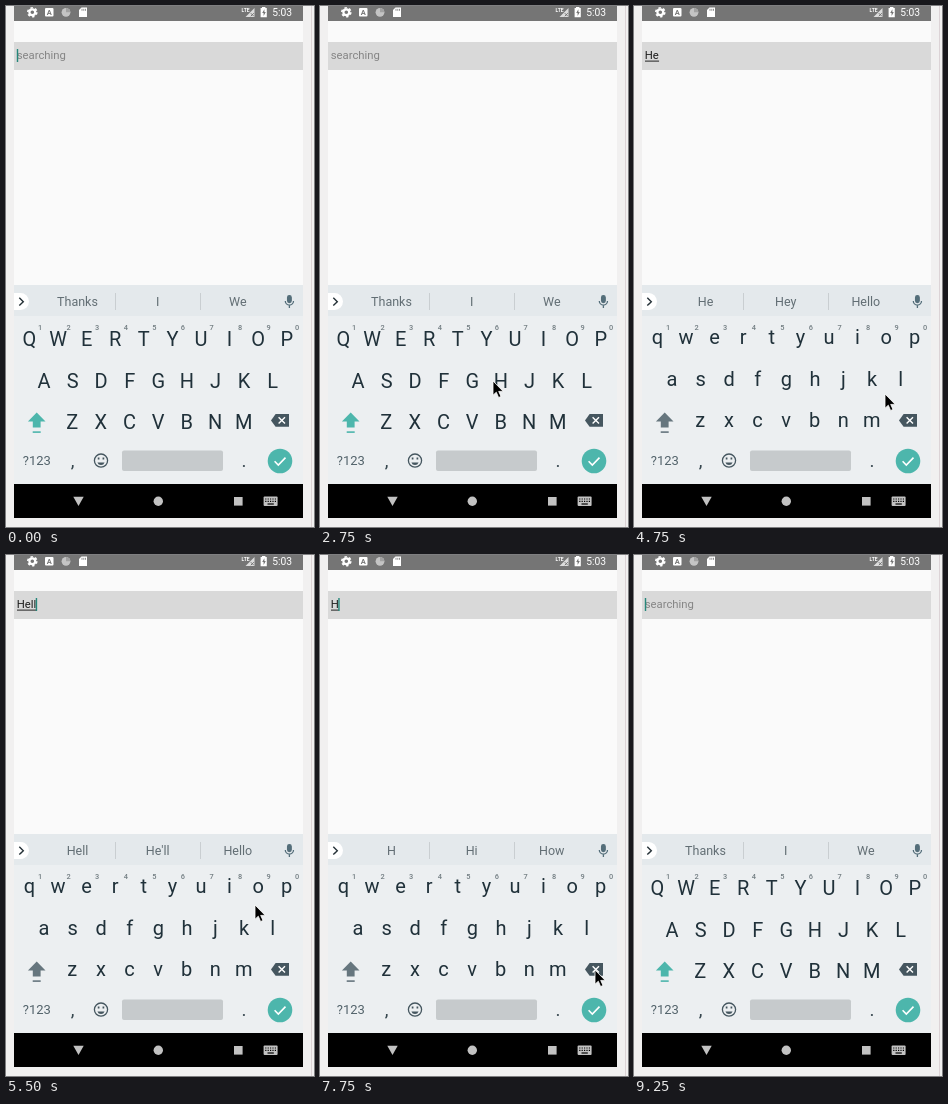
Recreate the animation shown at these times as an HTML page. Size 308 px wide and 521 px high, loop 9.5 s.

```html
<!DOCTYPE html>
<html lang="en">
<head>
<meta charset="utf-8">
<title>Search field typing</title>
<style>
html, body { margin: 0; width: 100%; height: 100%; overflow: hidden; background: #f1f0f0; }
svg { display: block; width: 308px; height: 521px; font-family: Roboto, sans-serif; }
.mid { text-anchor: middle; }
</style>
</head>
<body>
<svg id="stage" viewBox="0 0 308 521" xmlns="http://www.w3.org/2000/svg">
  <rect width="308" height="521" fill="#f1f0f0"/>
  <rect x="305" width="1" height="521" fill="#dcd3d6"/>
  <rect x="8" width="289" height="512" fill="#fafafa"/>
  <rect x="8" width="289" height="15" fill="#757575"/>
  <rect x="8" y="36" width="289" height="28" fill="#d9d9d9"/>

  <g id="status" fill="#fff">
    <circle cx="26.3" cy="6.3" r="2.9" fill="none" stroke="#fff" stroke-width="2.2"/>
    <circle cx="26.3" cy="6.3" r="4.5" fill="none" stroke="#fff" stroke-width="1.6" stroke-dasharray="2.35 2.36"/>
    <rect x="39" y="2" width="8.5" height="8.5" rx="1"/>
    <text class="mid" x="43.2" y="9" font-size="7.5" font-weight="700" fill="#757575">A</text>
    <circle cx="60" cy="6.3" r="4.4" fill="#c4c4c4"/>
    <path d="M60 1.9a4.4 4.4 0 0 1 4.4 4.4H60Z" fill="#a2a2a2"/>
    <path d="M75.5 1.5H81V11H73V4Z"/>
    <path d="M76 2.8v2M77.8 2.8v2M79.5 2.8v2" stroke="#757575" stroke-width=".8"/>
    <text x="235.5" y="5.6" font-size="5" font-weight="700">LTE</text>
    <path d="M248.5 2V11H239.5Z" opacity=".75"/>
    <path d="M244.8 7.2l3 3m0-3l-3 3" stroke="#757575"/>
    <path d="M256 2v-1h3.4v1h1.4v9.3h-6.2V2Z"/>
    <path d="M258.4 3.2l-2.2 3.7h1.4v3l2.2-3.9h-1.4Z" fill="#757575"/>
    <text x="266.3" y="10.2" font-size="10.3">5:03</text>
  </g>

  <rect x="8" y="279" width="289" height="32" fill="#e4e9ec"/>
  <rect x="8" y="310" width="289" height="168" fill="#eceff1"/>
  <path d="M109.5 287v17M194.5 287v17" stroke="#c9ced1"/>
  <path d="M8 287h6.5a8.5 8.5 0 0 1 0 17H8Z" fill="#fff"/>
  <path d="M13.3 291.8l4 3.9-4 3.9" fill="none" stroke="#263238" stroke-width="1.4"/>
  <g fill="none" stroke="#546e7a" stroke-width="1.3">
    <rect x="281.6" y="289.6" width="3.6" height="7" rx="1.8" fill="#546e7a"/>
    <path d="M279.3 295a4.1 4.1 0 0 0 8.2 0M283.4 299v3"/>
  </g>

  <g id="hints" class="mid" font-size="7.4" font-weight="500" fill="#727d82"></g>
  <g id="keys" class="mid" font-size="20" fill="#20313a"></g>
  <g id="shift">
    <path d="M30.7 406.5l8.8 9h-4.9v6h-7.8v-6h-4.9Z"/>
    <rect x="26.7" y="425.3" width="8" height="1.6"/>
  </g>
  <rect id="erase" x="254" y="398" width="40" height="33" rx="1" fill="#d9dcde"/>
  <path d="M269.6 408H283v12.8H269.6L265 414.4Z" fill="#45565f"/>
  <path d="M272.6 411.2l6.4 6.4m0-6.4l-6.4 6.4" stroke="#fff" stroke-width="1.4"/>

  <g class="mid" fill="#37474f">
    <text x="30.8" y="459.4" font-size="13" fill="#52626a">?123</text>
    <text x="66.7" y="460.5" font-size="19">,</text>
    <text x="238" y="460.5" font-size="19">.</text>
  </g>
  <g fill="none" stroke="#45565f" stroke-width="1.3">
    <circle cx="95" cy="454.6" r="6.6"/>
    <path d="M91.4 456.4a3.8 3.8 0 0 0 7.2 0Z" fill="#45565f" stroke="none"/>
    <path d="M92.6 451.5v2M97.4 451.5v2" stroke-width="1.7"/>
  </g>
  <rect x="116" y="444.5" width="101" height="20.5" rx="2" fill="#c6cacc"/>
  <circle cx="274" cy="455" r="12.3" fill="#4db6ac"/>
  <path d="M268.6 455.3l3.7 3.7 7.2-7.4" fill="none" stroke="#fff" stroke-width="1.6"/>

  <rect x="8" y="478" width="289" height="34" fill="#000"/>
  <g fill="#c2c2c2">
    <path d="M67.3 490.7h10.4L72.5 500Z"/>
    <circle cx="152.3" cy="495.3" r="4.7"/>
    <rect x="228" y="491" width="8.6" height="8.6"/>
    <rect x="257.6" y="490.6" width="14" height="9.4" rx="1"/>
    <path d="M259.2 493h11M259.2 495.3h11" stroke="#000" stroke-width="1.2" stroke-dasharray="1.2 1.2"/>
    <path d="M261.5 498h6.3" stroke="#000" stroke-width="1.2"/>
  </g>

  <g id="words" class="mid" font-size="12.5" fill="#626e74"></g>
  <text id="entry" x="10.7" y="53.2" font-size="11.3"></text>
  <rect id="under" x="11" y="54.6" height="1" fill="#222"/>
  <rect id="caret" y="43" width="1.4" height="13" fill="#26877b"/>

  <g id="popup">
    <rect x="-15.5" y="-65.5" width="31" height="84" rx="2.5" fill="#000" opacity=".13"/>
    <rect x="-15" y="-66.5" width="30" height="83.5" rx="2.5" fill="#d6d8d9"/>
    <text id="big" class="mid" y="-39" font-size="21" fill="#20313a"></text>
    <text id="dots" class="mid" x="8" y="-31" font-size="9" fill="#45565f">…</text>
  </g>
  <path id="mouse" d="M0 0V14.2L3.3 11.2 5.6 16.5 8 15.5 5.7 10.4H10.2Z" fill="#000" stroke="#fff" stroke-width=".8"/>
</svg>
<script>
const STEP = 250, LOOP = 9500, PITCH = 28.58;
const $ = id => document.getElementById(id);

function label(parent, x, y, str) {
  const node = document.createElementNS("http://www.w3.org/2000/svg", "text");
  node.setAttribute("x", x);
  node.setAttribute("y", y);
  node.textContent = str;
  $(parent).append(node);
  return node;
}
const show = (id, on) => $(id).setAttribute("visibility", on ? "visible" : "hidden");

const keys = {};
[["qwertyuiop", 23.5, 332], ["asdfghjkl", 38, 374], ["zxcvbnm", 66.3, 415]].forEach(([row, x0, y]) => {
  [...row].forEach((ch, i) => {
    const x = x0 + i * PITCH;
    keys[ch] = { x, y, node: label("keys", x, y, ch) };
  });
});
[..."1234567890"].forEach((d, i) => label("hints", 34 + i * PITCH, 323.6, d));
const words = [71.5, 151.7, 231.8].map(x => label("words", x, 300.4, ""));

const guesses = {
  "": "Thanks I We", H: "H Hi How", He: "He Hey Hello",
  Hel: "Hel Hello Help", Hell: "Hell He'll Hello", Hello: "Hello Hell He'll"
};
// [time, text in the field]
const typed = [
  [0, ""], [3250, "H"], [4000, "He"], [5250, "Hel"], [5500, "Hell"], [6000, "Hello"],
  [7000, "Hell"], [7250, "Hel"], [7500, "He"], [7750, "H"], [8000, ""]
];
const presses = { 3000: "h", 3750: "e", 5000: "l", 5250: "l", 5750: "o", 6750: "erase", 7250: "erase" };
// [time, x, y]; without a place the pointer is away
const path = [
  [0], [250, 150, 120], [500, 195, 250], [750, 222, 386], [1000, 188, 386], [1250, 173, 381],
  [1500, 173, 379], [1750, 173, 377], [2000, 173, 375], [3500, 130, 352], [3750, 76, 332],
  [4000, 78, 333], [4250, 130, 350], [4500, 212, 374], [4750, 251, 388], [5000, 264, 380],
  [5500, 249, 350], [5750, 251, 333], [6250, 256, 370], [6500, 274, 430], [6750, 276, 413],
  [7500, 275, 415], [8250, 272, 410], [8500, 255, 374], [8750, 190, 180], [9000, 150, 14], [9250]
];
const at = (list, t) => list.filter(e => e[0] <= t).pop();

function draw(time) {
  const t = Math.floor(time % LOOP / STEP) * STEP;
  const [since, text] = at(typed, t);
  const press = presses[t];
  const caps = !text;
  const shape = ch => caps ? ch.toUpperCase() : ch;

  for (const ch in keys) {
    const { y, node } = keys[ch];
    node.textContent = shape(ch);
    node.setAttribute("y", y + (caps ? 7.6 : 5.9));
  }
  guesses[text].split(" ").forEach((w, i) => words[i].textContent = w);
  $("shift").setAttribute("fill", caps ? "#4db6ac" : "#66767e");

  const entry = $("entry");
  entry.textContent = text || "searching";
  entry.setAttribute("fill", text ? "#1c1c1c" : "#858585");
  const width = text ? entry.getComputedTextLength() : 0;
  $("under").setAttribute("width", width);
  $("caret").setAttribute("x", 10.8 + Math.max(0, width - .6));
  show("caret", (t - since) % 1000 < 500);

  const key = keys[press];
  show("erase", press === "erase");
  show("popup", key);
  show("dots", key && press !== "h");
  if (key) {
    $("popup").setAttribute("transform", `translate(${key.x} ${key.y})`);
    $("big").textContent = shape(press);
  }

  const [, x, y] = at(path, t);
  show("mouse", x !== undefined);
  if (x !== undefined) $("mouse").setAttribute("transform", `translate(${x} ${y})`);
}

const start = performance.now();
function tick() {
  draw(performance.now() - start);
  requestAnimationFrame(tick);
}
tick();
</script>
</body>
</html>
```
